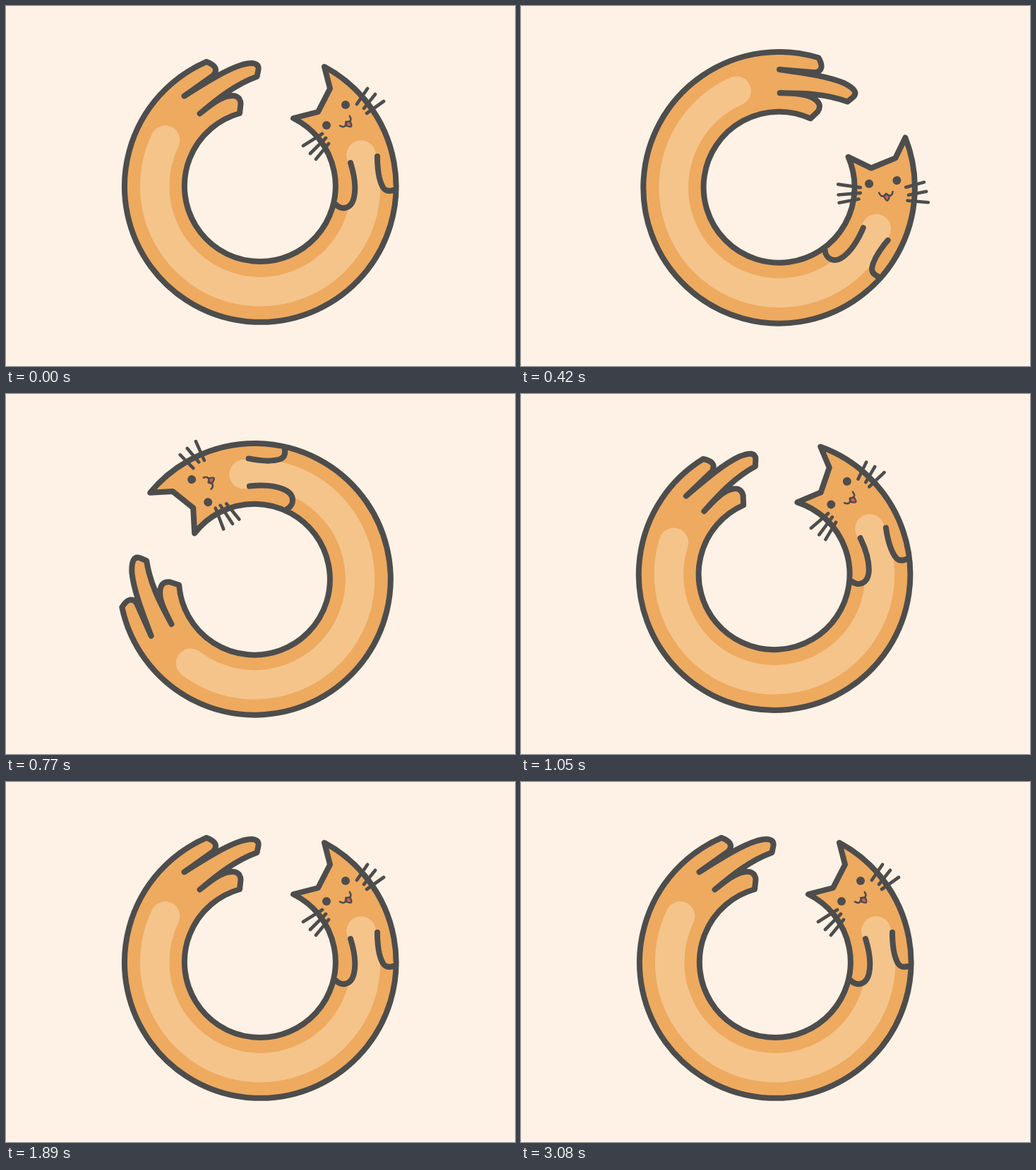
Recreate the animation shown at these times as an HTML page. Size 721x510 px, loop 3.11 s.

```html
<!DOCTYPE html>
<html lang="en">
<head>
<meta charset="utf-8">
<title>Round cat</title>
<style>
  html, body { margin: 0; width: 100%; height: 100%; overflow: hidden; background: #fef1e5; }
  svg { display: block; }
  #cat { fill: #eeaa5f; stroke: #4d4d4d; stroke-width: 8; stroke-linecap: round; stroke-linejoin: round; }
  .stripe { fill: none; stroke: #f4c48b; stroke-width: 41.5; }
  .whiskers { stroke-width: 4.6; }
  .solid { fill: #4d4d4d; stroke: none; }
  .mouth { fill: none; stroke-width: 2.6; }
  .tongue { fill: #e0585a; stroke-width: 2.4; }
</style>
</head>
<body>
<svg width="721" height="510" viewBox="0 0 721 510">
  <g id="cat">
    <!-- body, hind paws, tail and ears -->
    <path d="M451 86 A192.3 192.3 0 1 1 284 79 C295 83 301 89 294 98 L252.5 127.5
             C285 107 312 90 335 83 Q359 77 357.5 90 L355.5 100
             C325 111 300 131 274.5 152.5 C290 140 304 129 316 127.5 Q331 125 332.5 138 L331 152
             A107 107 0 1 0 407 159 L442 150 L459 117 Z"/>
    <path class="solid" d="M274 153 L319 117 L317 128 Z"/>
    <path class="stripe" d="M225.6 190 A149.5 149.5 0 1 0 503 211"/>
    <!-- front paws -->
    <path d="M488 222 C493 238 496 257 493 271 C489 289 474 289 467 281"/>
    <path d="M526 213 C526 235 530 250 534 257 Q539 265 551 260"/>
    <path class="whiskers" d="M512 117 L497 139 M523 125 L507 145 M535 135 L511 152
                              M421 198 L448 181 M431 209 L453 187 M439 217 L457 195"/>
    <g class="solid">
      <circle cx="481" cy="140" r="6"/>
      <circle cx="454" cy="169" r="6"/>
    </g>
    <g transform="translate(481.5 164) rotate(-45)">
      <path class="tongue" d="M-3.5 4 Q-1 10 .5 10 Q2.5 10 4.5 4 L0 .5 Z"/>
      <path class="mouth" d="M-10 -2 Q-7 7.5 0 0 Q7 7.5 9.5 -2"/>
    </g>
  </g>
</svg>
<script>
  const LOOP = 3110, STEP = 70;
  const SPIN_START = 13, SPIN_TIME = 1244;
  const cat = document.getElementById('cat');

  // Cubic bezier easing with handles (x1, 0) and (x2, 1), solved by bisection
  function ease(x, x1 = 0.737, x2 = 0.289) {
    if (x <= 0) return 0;
    if (x >= 1) return 1;
    let lo = 0, hi = 1, s;
    for (let i = 0; i < 30; i++) {
      s = (lo + hi) / 2;
      const r = 1 - s;
      if (3 * x1 * s * r * r + 3 * x2 * s * s * r + s * s * s < x) lo = s;
      else hi = s;
    }
    return s * s * (3 - 2 * s);
  }

  function draw() {
    const t = Math.floor(performance.now() % LOOP / STEP) * STEP;
    const angle = 360 * ease((t - SPIN_START) / SPIN_TIME);
    cat.setAttribute('transform', `rotate(${angle} 360.5 263.7)`);
    requestAnimationFrame(draw);
  }
  draw();
</script>
</body>
</html>
```
